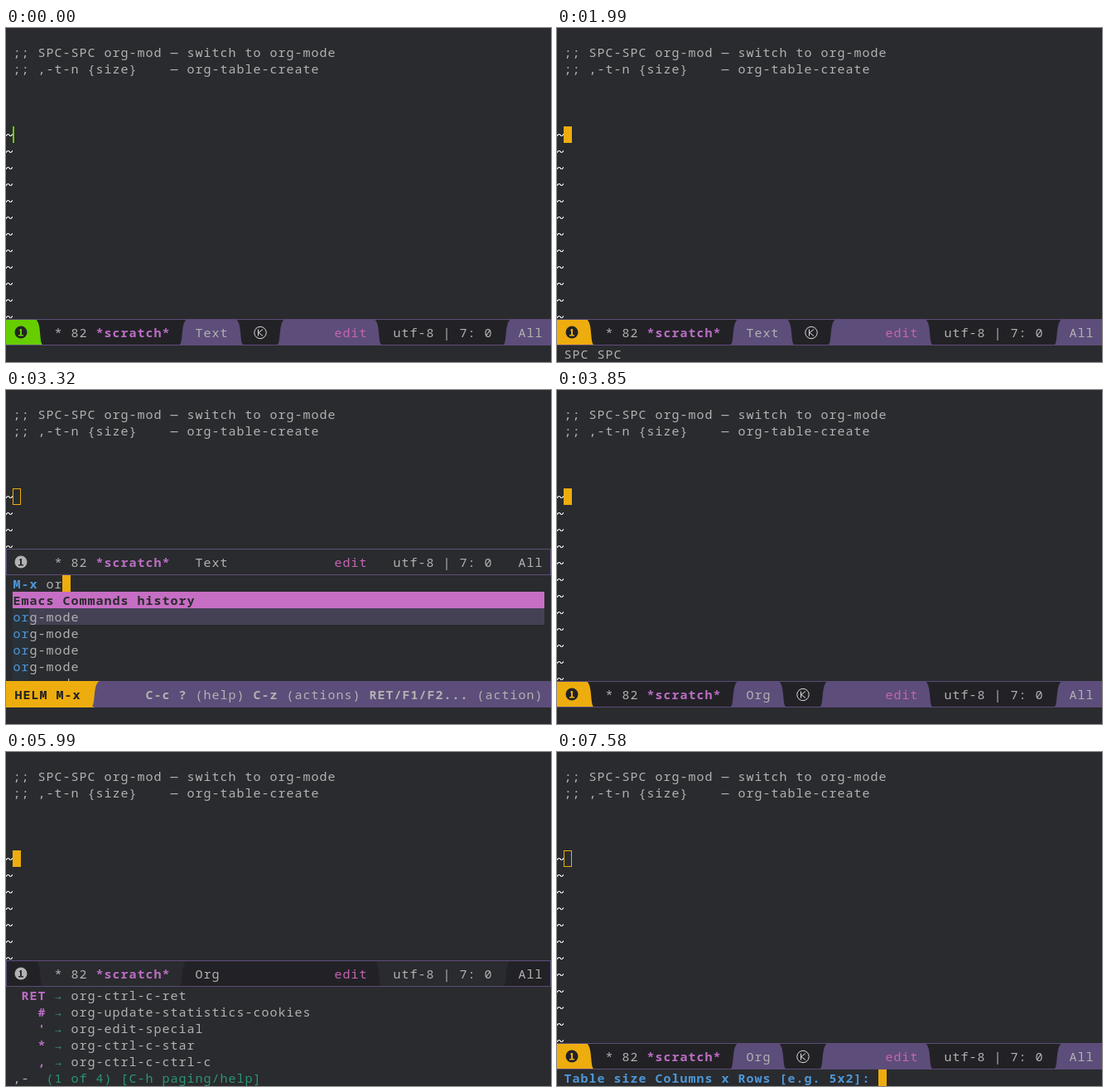
An HTML page with a canvas that plays this animation: 658x404 px, repeating every 8000 ms.

```html
<!DOCTYPE html>
<html lang="en">
<head>
<meta charset="utf-8">
<title>Org table in Emacs</title>
<style>
html, body { margin: 0; width: 100%; height: 100%; overflow: hidden; background: #292b2e; }
canvas { display: block; width: 658px; height: 404px; }
</style>
</head>
<body>
<canvas id="stage" width="658" height="404"></canvas>
<script>
const ctx = document.getElementById('stage').getContext('2d');
const W = 658, H = 404, LOOP = 8000, CELL = 10, ROW = 20;
const BG = '#292b2e', DARK = '#222226', FG = '#b2b2b2', PURPLE = '#5d4d7a';
const YELLOW = '#eead0e', GREEN = '#66cd00', PINK = '#bc6ec5', BLUE = '#4f97d7', TEAL = '#2d9574';

const STEPS = [
  { at: 0, insert: true },
  { at: 1060 },
  { at: 1860, echo: 'SPC' },
  { at: 1990, echo: 'SPC SPC' },
  { at: 2120, helm: '' },
  { at: 2920, helm: 'o' },
  { at: 3050, helm: 'or' },
  { at: 3320, helm: 'or', filtered: true },
  { at: 3850, mode: 'Org' },
  { at: 4920, mode: 'Org', echo: ',-' },
  { at: 5990, mode: 'Org', echo: ',-', keys: 'main', inactive: true, banded: true },
  { at: 6120, mode: 'Org', echo: ',-', keys: 'main', inactive: true },
  { at: 6520, mode: 'Org', echo: ', t-', keys: 'table' },
  { at: 7450, mode: 'Org' },
  { at: 7580, mode: 'Org', prompt: 'Table size Columns x Rows [e.g. 5x2]:' }
];

const MAIN_KEYS = [
  ['RET', 'org-ctrl-c-ret'],
  ['#', 'org-update-statistics-cookies'],
  ["'", 'org-edit-special'],
  ['*', 'org-ctrl-c-star'],
  [',', 'org-ctrl-c-ctrl-c']
];
const TABLE_KEYS = [
  ['a', 'org-table-align'], ['b', 'org-table-blank-field'], ['c', 'org-table-convert'],
  ['e', 'org-table-eval-formula'], ['f', 'org-table-field-info'],
  ['h', 'org-table-previous-field'], ['j', 'org-table-next-row'], ['l', 'org-table-next-field'],
  ['n', 'org-table-create'], ['p', 'org-plot/gnuplot']
];

function rect(x, y, w, h, color) {
  ctx.fillStyle = color;
  ctx.fillRect(x, y, w, h);
}

function text(s, x, y, color = FG, bold = false) {
  ctx.font = (bold ? 'bold ' : '') + '15px "Noto Sans Mono", "DejaVu Sans Mono", monospace';
  ctx.letterSpacing = '1px';
  ctx.textAlign = 'left';
  ctx.fillStyle = color;
  ctx.fillText(s, x + 0.5, y);
}

function clipped(x, y, w, h, draw) {
  ctx.save();
  ctx.beginPath();
  ctx.rect(x, y, w, h);
  ctx.clip();
  draw();
  ctx.restore();
}

// Fringe mark: three rows of an 8-pixel bitmap.
function tilde(y) {
  [0b01110001, 0b11011011, 0b10001110].forEach((bits, row) => {
    for (let i = 0; i < 8; i++) {
      if (bits >> (7 - i) & 1) rect(i, y + row, 1, 1, '#cfcfcf');
    }
  });
}

function buffer(bottom, cursor) {
  text(';; SPC-SPC org-mod — switch to org-mode', 8, 35);
  text(';; ,-t-n {size}    — org-table-create', 8, 55);
  clipped(0, 0, W, bottom, () => {
    for (let y = 128; y < bottom; y += ROW) tilde(y);
  });
  if (cursor === 'bar') rect(8, 119, 2, ROW, GREEN);
  else if (cursor === 'box') rect(8, 119, CELL, ROW, YELLOW);
  else {
    ctx.strokeStyle = YELLOW;
    ctx.lineWidth = 1;
    ctx.strokeRect(8.5, 119.5, CELL - 1, ROW - 1);
  }
}

// A segment with flared edges, narrow at the top and wide at the bottom.
function segment(left, right, top, color) {
  const bottom = top + 31;
  ctx.fillStyle = color;
  ctx.beginPath();
  if (left <= 0) {
    ctx.moveTo(0, bottom);
    ctx.lineTo(0, top);
  } else {
    ctx.moveTo(left - 2, bottom);
    ctx.bezierCurveTo(left + 2, bottom - 4, left - 1, top + 3, left + 7, top);
  }
  if (right >= W) {
    ctx.lineTo(W, top);
    ctx.lineTo(W, bottom);
  } else {
    ctx.lineTo(right - 7, top);
    ctx.bezierCurveTo(right + 1, top + 3, right - 2, bottom - 4, right + 2, bottom);
  }
  ctx.fill();
}

function disc(x, y, r, color) {
  ctx.fillStyle = color;
  ctx.beginPath();
  ctx.arc(x, y, r, 0, Math.PI * 2);
  ctx.fill();
}

function badge(y, color, ink) {
  disc(18, y, 7.5, color);
  rect(17, y - 4, 2, 8, ink);
  rect(16, y - 3, 1, 1, ink);
  rect(15, y + 3, 6, 1.5, ink);
}

function circledK(x, y) {
  ctx.strokeStyle = '#dcdcdc';
  ctx.lineWidth = 1;
  ctx.beginPath();
  ctx.arc(x, y, 7.2, 0, Math.PI * 2);
  ctx.moveTo(x - 2.5, y - 4);
  ctx.lineTo(x - 2.5, y + 4);
  ctx.moveTo(x + 3, y - 4);
  ctx.lineTo(x - 2, y);
  ctx.lineTo(x + 3, y + 4);
  ctx.stroke();
}

function modeLine(top, { mode = 'Text', insert, inactive, banded }) {
  const nameEnd = 228 + mode.length * CELL + 16;
  const accent = insert ? GREEN : YELLOW;
  const base = top + 22;
  rect(0, top, W, 32, inactive ? BG : DARK);
  if (!inactive) {
    segment(0, 42, top, accent);
    segment(212, nameEnd, top, PURPLE);
    segment(nameEnd + 46, 451, top, PURPLE);
    segment(603, W, top, PURPLE);
    circledK(nameEnd + 23, top + 16.5);
  } else if (banded) {
    segment(0, 42, top, DARK);
    segment(212, 451, top, DARK);
    segment(603, W, top, DARK);
  }
  rect(0, top, W, 1, PURPLE);
  rect(0, top + 31, W, 1, PURPLE);
  if (inactive) {
    rect(0, top, 1, 32, PURPLE);
    rect(W - 1, top, 1, 32, PURPLE);
  }
  badge(top + 16, inactive ? FG : DARK, inactive ? BG : accent);
  text('* 82', 58, base);
  text('*scratch*', 108, base, PINK, true);
  text(mode, 228, base);
  text('edit', 396, base, '#c664b4');
  text('utf-8 | 7: 0', 467, base);
  text('All', 618, base);
}

function helm(query, filtered) {
  text('M-x', 8, 240, BLUE, true);
  text(query, 48, 240);
  rect(48 + query.length * CELL, 224, CELL, ROW, YELLOW);
  rect(8, 244, 642, ROW, '#c66ec3');
  text('Emacs Commands history', 8, 260, BG, true);
  rect(8, 264, 642, ROW, '#444155');
  clipped(0, 264, W, 88, () => {
    for (let i = 0; i < 5; i++) {
      const y = 280 + i * ROW;
      if (filtered) {
        rect(8, y - 16, 2 * CELL, ROW, '#293239');
        text('or', 8, y, BLUE);
        text('g-mode', 28, y);
      } else {
        text(i % 2 ? 'text-mode' : 'org-mode', 8, y);
      }
    }
  });
  rect(0, 352, W, 32, YELLOW);
  segment(106, W, 352, PURPLE);
  rect(106, 383, W - 106, 1, PURPLE);
  text('HELM M-x', 10, 374, DARK, true);
  [['C-c ?', 168, true], ['(help)', 228], ['C-z', 298, true], ['(actions)', 338],
   ['RET/F1/F2...', 438, true], ['(action)', 568]]
    .forEach(([s, x, bold]) => text(s, x, 374, FG, bold));
}

function keyList(list, x, width) {
  list.forEach(([key, command], i) => {
    const left = x + Math.floor(i / 5) * 280;
    const y = 300 + i % 5 * ROW;
    const end = left + width * CELL;
    text(key, end - key.length * CELL, y, PINK, true);
    text('→', end + CELL, y, TEAL);
    text(command, end + 3 * CELL, y);
  });
}

function draw(step) {
  rect(0, 0, W, H, BG);
  if (step.helm !== undefined) {
    buffer(192, 'hollow');
    modeLine(192, { inactive: true });
    helm(step.helm, step.filtered);
    return;
  }
  const top = step.keys ? 252 : 352;
  buffer(top, step.insert ? 'bar' : step.prompt ? 'hollow' : 'box');
  modeLine(top, step);
  if (step.keys === 'main') {
    keyList(MAIN_KEYS, 18, 3);
    text('(1 of 4) [C-h paging/help]', 48, 400, TEAL);
  } else if (step.keys === 'table') {
    keyList(TABLE_KEYS, 18, 1);
  }
  if (step.echo) text(step.echo, 8, 400);
  if (step.prompt) {
    text(step.prompt, 8, 400, BLUE, true);
    rect(388, 384, CELL, ROW, YELLOW);
  }
}

const start = performance.now();
function tick() {
  const t = (performance.now() - start) % LOOP;
  draw(STEPS.findLast(step => step.at <= t) || STEPS[0]);
  requestAnimationFrame(tick);
}
tick();
</script>
</body>
</html>
```
